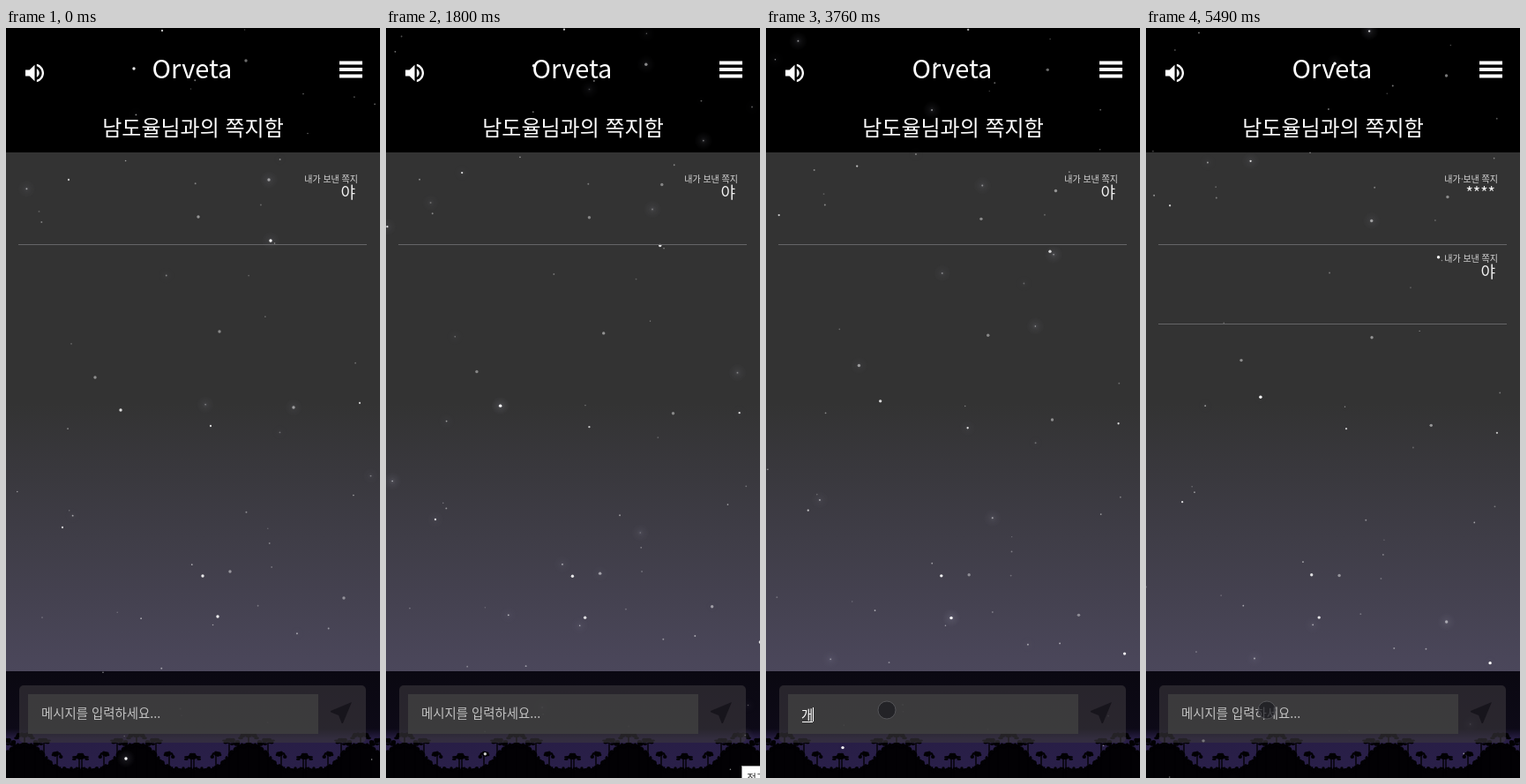
Write an HTML page with a canvas that moves like this. It is 424x850 px and loops after 5520 ms.

```html
<!DOCTYPE html>
<html lang="ko">
<head>
<meta charset="utf-8">
<title>쪽지함</title>
<style>
  html, body { margin: 0; width: 100%; height: 100%; overflow: hidden; background: #000; }
  canvas, svg { position: absolute; left: 0; top: 0; width: 424px; height: 850px; }
  text { font-family: "Noto Sans CJK KR", "Noto Sans CJK", "Noto Sans", sans-serif; fill: #fff; }
  .small { font-size: 10px; text-anchor: end; fill: #d8d8d8; }
  .note { font-size: 18px; text-anchor: end; font-weight: 300; fill: #f2f2f2; }
  .rule { stroke: #656567; stroke-width: 1; }
</style>
</head>
<body>
<canvas id="sky" width="424" height="850"></canvas>
<svg viewBox="0 0 424 850">
  <text x="211" y="57" font-size="29" text-anchor="middle">Orveta</text>
  <text x="212" y="122" font-size="24" font-weight="500" text-anchor="middle">남도율님과의 쪽지함</text>
  <path transform="translate(18.5 37) scale(1.167)" fill="#fff" d="M3 9v6h4l5 5V4L7 9H3zm13.5 3c0-1.77-1.02-3.29-2.5-4.03v8.05c1.48-.73 2.5-2.25 2.5-4.02zM14 3.23v2.06c2.89.86 5 3.54 5 6.71s-2.11 5.85-5 6.71v2.06c4.01-.91 7-4.49 7-8.77s-2.99-7.86-7-8.77z"/>
  <path fill="#fff" d="M378 37.5h26v4h-26zM378 45h26v4h-26zM378 52.5h26v4h-26z"/>
  <path transform="translate(364 760) scale(1.333)" fill="#17151c" d="M21 3L3 10.53v.98l6.84 2.65L12.48 21h.98L21 3z"/>

  <g id="sent">
    <text class="small" x="399" y="175">내가 보낸 쪽지</text>
    <text class="note" x="396" y="193">****</text>
    <path class="rule" d="M14 245.5H409"/>
  </g>
  <g id="first">
    <text class="small" x="399" y="175">내가 보낸 쪽지</text>
    <text class="note" x="396" y="193">야</text>
    <path class="rule" d="M14 245.5H409"/>
  </g>

  <text id="hint" x="40" y="782" font-size="14.4" style="fill:#c2c2c2">메시지를 입력하세요...</text>
  <g id="typed">
    <text x="40" y="784" font-size="14.4">개</text>
    <path d="M41 786.5H53" stroke="#fff"/>
  </g>
  <path id="caret" d="M0 770V786" stroke="#fff"/>
  <circle id="dot" r="10" fill="#1a1a20" fill-opacity=".72" stroke="#5c5c60" stroke-opacity=".8"/>
  <g id="tip">
    <rect x="403.5" y="836.5" width="40" height="30" fill="#fff" stroke="#999"/>
    <text x="409" y="855" font-size="12" style="fill:#333">접기</text>
  </g>
</svg>
<script>
const W = 424, H = 850, LOOP = 5520, SPIN = 0.0328 / 1000;
const $ = id => document.getElementById(id);
const ctx = $('sky').getContext('2d');

let seed = 11;
const rnd = () => (seed = (seed * 16807) % 2147483647) / 2147483647;

// Stars turn about the stage centre; the brightest are placed, the rest scattered
const stars = [];
function addStar(d, ang, r, a) {
  stars.push({ d, ang, r, a, phase: rnd() * 6.28, rate: .0008 + rnd() * .0016 });
}
function placeStar(x, y, r, a) {
  const dx = x - W / 2, dy = y - H / 2;
  addStar(Math.hypot(dx, dy), Math.atan2(dy, dx), r, a);
}
for (const [x, y] of [[145, 46], [300, 241], [130, 433], [223, 621], [240, 667], [136, 828], [440, 683]])
  placeStar(x, y, 1.7, 1);
for (const [x, y] of [[272, 37], [218, 214], [298, 172], [242, 344], [101, 396], [326, 430], [254, 616], [383, 646]])
  placeStar(x, y, 1.7, .5);
for (const [x, y] of [[177, 3], [71, 172], [232, 451], [64, 566], [401, 425], [-10, 238]])
  placeStar(x, y, 1.15, .85);
for (let i = 0; i < 105; i++)
  addStar(475 * Math.sqrt(rnd()), rnd() * 2 * Math.PI, .7 + rnd() * .3, .25 + rnd() * .4);

function makeCanvas(w, h) {
  const c = document.createElement('canvas');
  c.width = w; c.height = h;
  return c;
}

const glow = makeCanvas(24, 24);
{
  const g = glow.getContext('2d'), grad = g.createRadialGradient(12, 12, 0, 12, 12, 11);
  grad.addColorStop(0, 'rgba(205,205,230,.3)');
  grad.addColorStop(.35, 'rgba(180,180,200,.13)');
  grad.addColorStop(1, 'rgba(180,180,200,0)');
  g.fillStyle = grad;
  g.fillRect(0, 0, 24, 24);
}

function band(g, y0, y1, from, to) {
  const grad = g.createLinearGradient(0, y0, 0, y1);
  grad.addColorStop(0, from);
  grad.addColorStop(1, to);
  g.fillStyle = grad;
  g.fillRect(0, y0, W, y1 - y0);
}

const ease = (t, a, b) => {
  const p = Math.min(1, Math.max(0, (t - a) / (b - a)));
  return p * p * (3 - 2 * p);
};

function leaf(g, x, y, rx, ry) {
  g.beginPath();
  g.ellipse(x, y, rx, ry, 0, 0, 7);
  g.fill();
}

function tree(g, x, top, spread) {
  g.fillRect(x - .7, top + 2, 1.4, H - top);
  for (let i = 0; i < 14; i++) {
    const u = rnd() * 2 - 1;
    leaf(g, x + u * spread, top + 2 + u * u * 3 + rnd() * 4, 1 + rnd() * 2, .8 + rnd() * 1.2);
  }
}

// Thick growth every 127 px, mirrored, falling away to an open hollow between
function forest(g) {
  for (let c = 21; c < 440; c += 127) for (const side of [-1, 1]) {
    seed = 77;
    g.save();
    g.translate(c, 0);
    g.scale(side, 1);
    g.fillStyle = '#020104';
    for (let x = -1; x < 64; x++) {
      const y = 811 + 27 * ease(x, 4, 44) + rnd() * 3;
      g.fillRect(x, y, 1.3, H - y);
      if (x % 2) leaf(g, x, y + 1, 1 + rnd() * 2, 1 + rnd() * 2);
    }
    tree(g, 0, 797, 10);
    tree(g, 12, 806, 7);
    tree(g, 22, 803, 6);
    tree(g, 37, 818, 5);
    tree(g, 62, 821, 7);
    g.restore();
  }
}

const back = makeCanvas(W, H);
{
  const g = back.getContext('2d');
  g.fillRect(0, 0, W, H);
  band(g, 141, 425, '#333', '#333');
  band(g, 425, 729, '#333', '#4b475b');
  band(g, 729, 794, '#0a0811', '#0d0a17');
  band(g, 794, 806, '#0d0a17', '#281e46');
  band(g, 806, 850, '#281e46', '#2a204a');
  forest(g);
}

function drawStars(t) {
  ctx.fillStyle = '#fff';
  for (const s of stars) {
    const ang = s.ang + t * SPIN;
    const x = W / 2 + s.d * Math.cos(ang), y = H / 2 + s.d * Math.sin(ang);
    const wave = Math.sin(t * s.rate + s.phase);
    ctx.globalAlpha = Math.max(0, wave) ** 8 * (.3 + s.a * .5);
    ctx.drawImage(glow, x - 12, y - 12);
    ctx.globalAlpha = s.a * (.9 + .1 * wave);
    ctx.beginPath();
    ctx.arc(x, y, s.r, 0, 7);
    ctx.fill();
  }
  ctx.globalAlpha = 1;
}

function drawForm() {
  ctx.fillStyle = 'rgba(58,56,60,.62)';
  ctx.beginPath();
  ctx.roundRect(15, 745, 393, 65, 5);
  ctx.fill();
  ctx.fillStyle = 'rgba(64,64,64,.8)';
  ctx.fillRect(25, 755, 329, 45);
}

const show = (id, on) => $(id).style.display = on ? '' : 'none';

function drawPage(t) {
  const typing = t >= 3640 && t < 4500, sent = t >= 4560;
  show('sent', sent);
  $('first').setAttribute('transform', `translate(0 ${sent ? 90 : 0})`);
  show('typed', typing);
  show('hint', !typing);
  show('caret', typing || (t >= 4500 && t < 5000));
  $('caret').setAttribute('transform', `translate(${typing ? 53.5 : 40.5} 0)`);
  show('tip', t >= 850 && t < 1900);
  show('dot', t >= 1980);
  const move = ease(t, 1980, 2310), drift = ease(t, 2400, 2800);
  $('dot').setAttribute('cx', 330 - 196 * move + 3 * drift);
  $('dot').setAttribute('cy', 860 - 90 * move + 3 * drift);
}

const start = performance.now();
function frame(now) {
  const t = Math.max(0, now - start) % LOOP;
  ctx.drawImage(back, 0, 0);
  drawStars(t);
  drawForm();
  drawPage(t);
  requestAnimationFrame(frame);
}
frame(start);
</script>
</body>
</html>
```
